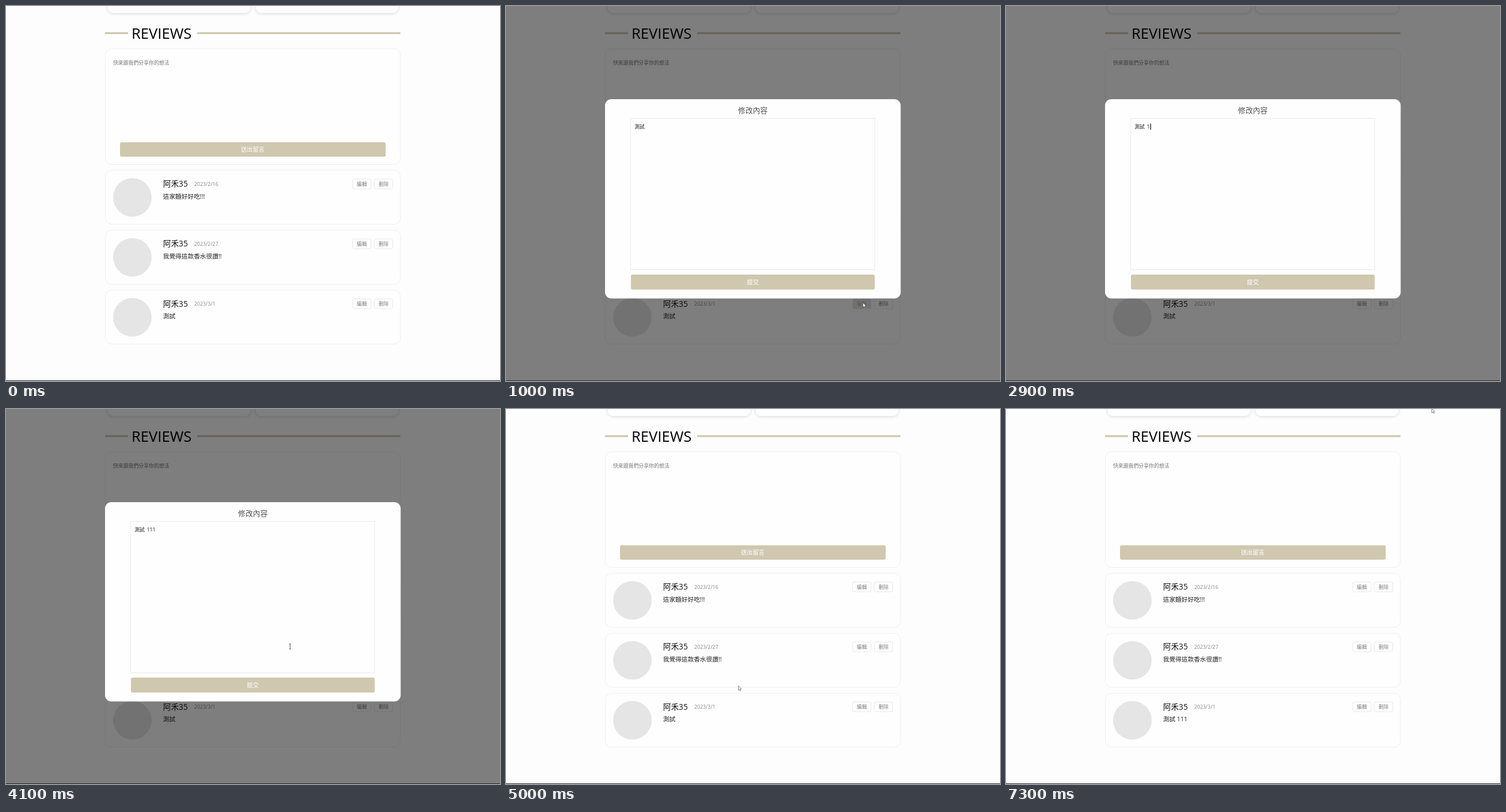
These frames come from a looping animation (858x652 px, 8.2 s). An HTML page:

```html
<!DOCTYPE html>
<html lang="zh-Hant">
<head>
<meta charset="utf-8">
<title>Reviews</title>
<style>
  html, body { margin: 0; width: 100%; height: 100%; overflow: hidden; background: #fdfdfd; }
  svg { display: block; width: 100vw; height: 100vh; }
  text { font-family: "Open Sans", "Noto Sans CJK TC", "Noto Sans CJK", sans-serif; font-weight: 300; white-space: pre; }
  .latin { font-weight: 400; }
</style>
</head>
<body>
<svg viewBox="0 0 858 652" xmlns="http://www.w3.org/2000/svg"></svg>
<script>
const LOOP = 8200, STEP = 100;
const SAND = [207, 200, 175], OLIVE = [138, 143, 105], WHITE = [254, 254, 254], GREY = [128, 128, 128];
const svg = document.querySelector('svg');
const css = c => `rgb(${c.map(Math.round)})`;

function add(parent, tag, attrs, content) {
  const el = document.createElementNS(svg.namespaceURI, tag);
  for (const k in attrs) el.setAttribute(k, attrs[k]);
  if (content) el.textContent = content;
  return parent.appendChild(el);
}
const group = parent => add(parent, 'g', {});
const rect = (g, x, y, width, height, fill, rx = 0, stroke = 'none') =>
  add(g, 'rect', { x, y, width, height, fill, rx, stroke });
const label = (g, x, y, size, fill, str, more) =>
  add(g, 'text', { x, y, 'font-size': size, fill, ...more }, str);
const middle = { 'text-anchor': 'middle' };

function smallButton(g, x, y, str) {
  return {
    box: rect(g, x, y, 32, 17, css(WHITE), 3, '#e8e8e8'),
    text: label(g, x + 16, y + 11.7, 8.8, css(GREY), str, middle)
  };
}

function review(y, date, str) {
  rect(page, 172.5, y, 512.5, 93.7, '#fefefe', 11, '#efefef');
  add(page, 'circle', { cx: 219.5, cy: y + 47, r: 33.5, fill: '#e4e5e4' });
  label(page, 272.7, y + 28.3, 13.7, '#111', '阿禾35', { class: 'latin' });
  label(page, 327, y + 26.8, 8.8, '#888', date, { class: 'latin' });
  const text = label(page, 272.7, y + 49, 10.7, '#222', str, { class: 'latin' });
  const edit = smallButton(page, 602, y + 15, '編輯');
  smallButton(page, 639.7, y + 15, '刪除');
  return { text, edit };
}

// Page
const page = group(svg);
rect(page, 0, 0, 858, 652, '#fdfdfd');
for (const x of [176, 433]) {
  const card = rect(page, x, -40, 249, 52.5, '#fefefe', 10, '#ececec');
  card.style.filter = 'drop-shadow(0 1px 2px rgba(0,0,0,.12))';
}
rect(page, 172, 45.5, 40, 3.3, css(SAND));
rect(page, 332, 45.5, 353, 3.3, css(SAND));
label(page, 218, 57, 25.6, '#000', 'REVIEWS', { class: 'latin' });
rect(page, 172.5, 74.5, 512.5, 201, '#fefefe', 11, '#efefef');
label(page, 186, 102.3, 8.9, '#777', '快來跟我們分享你的想法');
const send = rect(page, 198, 237, 461.5, 25, css(SAND), 3);
label(page, 428.5, 253.4, 10.2, '#fff', '送出留言', middle);
review(285.8, '2023/2/16', '這家麵好好吃!!!');
review(390, '2023/2/27', '我覺得這款香水很讚!!');
const last = review(494.2, '2023/3/1', '測試');

// Edit dialog
const modal = group(svg);
rect(modal, 0, 0, 858, 652, 'rgba(0,0,0,.5)');
rect(modal, 172, 162, 513.5, 346.5, '#fefefe', 11);
label(modal, 428.7, 185.8, 12.8, '#555', '修改內容', middle);
rect(modal, 216.5, 195.5, 424, 263, '#fefefe', 0, '#e9eaea');
const draft = label(modal, 223.3, 212.6, 8.8, '#222', '', { class: 'latin', style: 'word-spacing:1.2px' });
const caret = rect(modal, 250, 204.5, 1.2, 10.5, '#000');
const submit = rect(modal, 217, 467, 423.5, 26, css(SAND), 3);
label(modal, 428.7, 484.4, 10.5, '#fff', '提交', middle);

rect(svg, 0, 651, 858, 1, '#222');

// Pointers
const arrow = add(svg, 'path', {
  d: 'M0 0V7.6L1.8 6 3 8.7 4.2 8.1 3 5.6H5.2Z', fill: '#fff', stroke: '#555', 'stroke-width': .7
});
const beam = add(svg, 'path', { d: 'M-1.5-4.5H1.5M0-4.5V4.5M-1.5 4.5H1.5', stroke: '#333', 'stroke-width': .8 });

// Keys are [time, ...values], eased between neighbours
function track(t, keys) {
  if (t <= keys[0][0]) return keys[0].slice(1);
  const i = keys.findIndex(k => k[0] > t);
  if (i < 0) return keys[keys.length - 1].slice(1);
  const a = keys[i - 1], b = keys[i];
  const p = (t - a[0]) / (b[0] - a[0]), e = p * p * (3 - 2 * p);
  return a.slice(1).map((v, j) => v + (b[j + 1] - v) * e);
}
const mix = (a, b, p) => css(a.map((v, i) => v + (b[i] - v) * p));
const within = (t, spans) => spans.some(([a, b]) => t >= a && t < b);
const show = (el, on) => el.style.display = on ? '' : 'none';

const PATH = [[100, 745, -12], [600, 690, 450], [850, 619.5, 516], [1000, 620, 516], [1300, 510, 400],
  [4000, 510, 400], [4400, 403.7, 481.5], [6600, 403.7, 481.5], [7300, 739.5, -1]];
const EDIT_HOVER = [[800, 0], [900, .5], [1000, .22], [1100, 0]];
const SUBMIT_HOVER = [[4200, 0], [4400, 1]];
const SEND_HOVER = [[6900, 0], [7000, .35], [7100, 0]];
const CARET_ON = [[1300, 1700], [2200, 2600], [2900, 3900], [4400, 4900]];

function draw(t) {
  const [x, y] = track(t, PATH);
  const open = within(t, [[1000, 5000]]);
  const inField = open && within(t, [[1200, 4400]]);
  const typing = within(t, [[2900, 4100]]);
  for (const el of [arrow, beam]) el.setAttribute('transform', `translate(${x} ${y})`);
  show(arrow, t >= 200 && !inField);
  show(beam, inField && !typing);
  show(modal, open);

  const ones = [2900, 3200, 3300].filter(k => t >= k).length;
  draft.textContent = '測試' + (ones ? ' ' + '1'.repeat(ones) : '');
  show(caret, within(t, CARET_ON));
  caret.setAttribute('x', ones ? 245.6 + ones * 5.03 : 241.5);
  last.text.textContent = t >= 5400 ? '測試 111' : '測試';

  const [hover] = track(t, EDIT_HOVER);
  last.edit.box.setAttribute('fill', mix(WHITE, OLIVE, hover));
  last.edit.text.setAttribute('fill', mix(GREY, WHITE, Math.min(1, hover * 1.8)));
  submit.setAttribute('fill', mix(SAND, OLIVE, track(t, SUBMIT_HOVER)[0]));
  send.setAttribute('fill', mix(SAND, OLIVE, track(t, SEND_HOVER)[0]));
}

const start = performance.now();
function tick() {
  const t = (performance.now() - start) % LOOP;
  draw(Math.floor(t / STEP) * STEP);
  requestAnimationFrame(tick);
}
tick();
</script>
</body>
</html>
```
